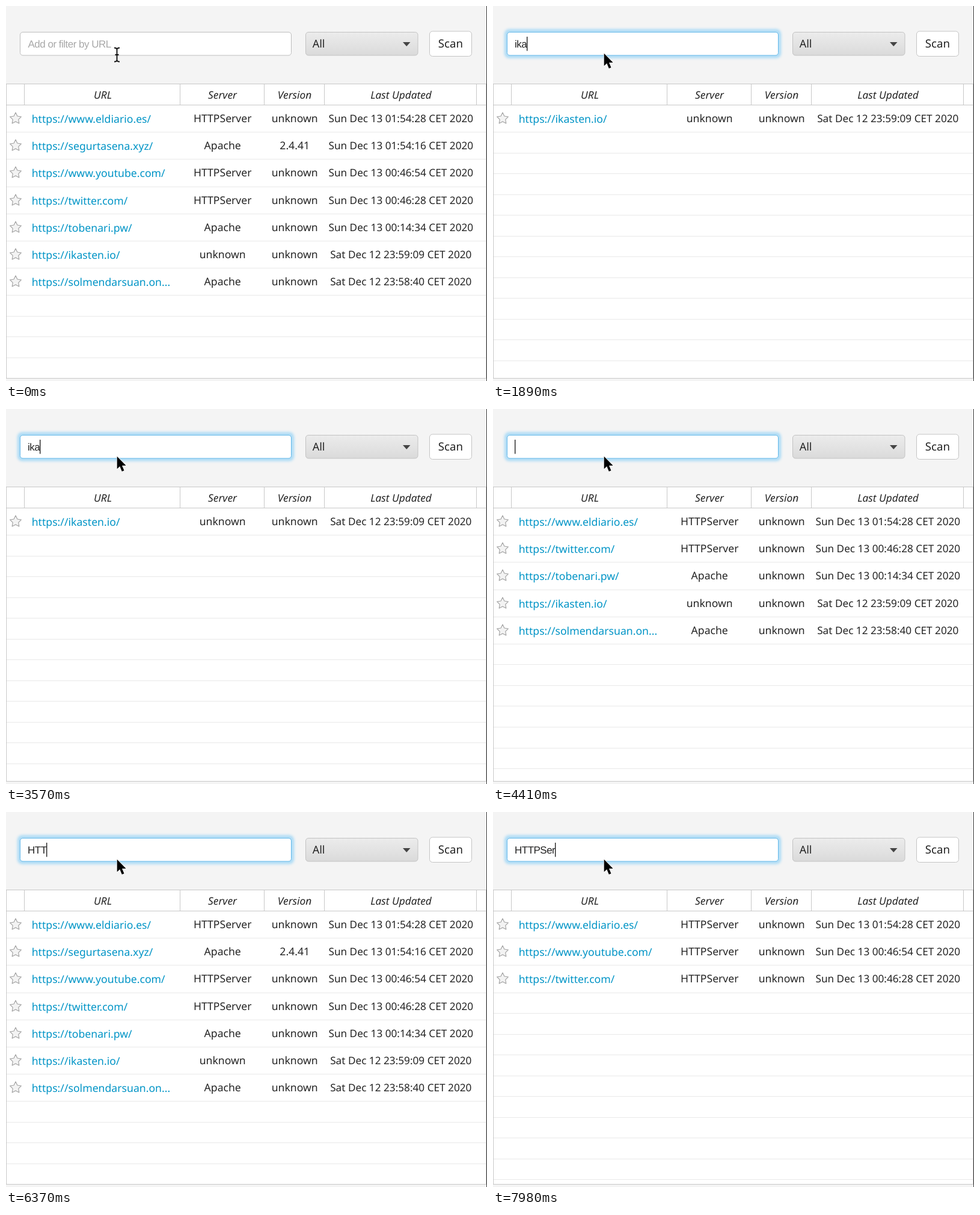
Animation, 800 px wide and 623 px high, one loop 8 s. Source, as an HTML page:

```html
<!DOCTYPE html>
<html lang="en">
<head>
<meta charset="utf-8">
<title>Server list filter</title>
<style>
  html, body { margin: 0; width: 100%; height: 100%; overflow: hidden; background: #f4f4f4; }
  svg { display: block; }
  text { font: 17.6px "Noto Sans", "Open Sans", sans-serif; fill: #242424; text-rendering: geometricPrecision; white-space: pre; }
  .mid { text-anchor: middle; }
  .head { font-size: 17.3px; font-style: italic; }
  .link { font-size: 17.65px; fill: #0094c6; }
  .date { font-size: 17.2px; }
  .input { font: 17px "Liberation Sans", Arial, sans-serif; letter-spacing: -.03em; }
  .prompt { fill: #a8a8a8; }
  .grid { fill: #e9e9e9; }
  .edge { fill: #c8c8c8; }
  .star { fill: #f3f3f3; stroke: #9f9f9f; stroke-width: 1.1; stroke-linejoin: round; }
</style>
</head>
<body>
<svg id="stage" width="800" height="623" viewBox="0 0 800 623">
  <defs>
    <linearGradient id="shade" x2="0" y2="1">
      <stop offset="0" stop-color="#ececec"/>
      <stop offset="1" stop-color="#dadada"/>
    </linearGradient>
    <filter id="soft" x="-5%" y="-40%" width="110%" height="180%"><feGaussianBlur stdDeviation="1.9"/></filter>
  </defs>
  <rect width="800" height="623" fill="#f4f4f4"/>

  <rect id="glow" x="22" y="41.5" width="454" height="42" rx="5" fill="none" stroke="#a9daf6" stroke-width="6" filter="url(#soft)"/>
  <rect id="field" x="23.5" y="43.5" width="451" height="38.5" rx="4.5" fill="#fff"/>
  <text id="prompt" class="input prompt" x="36.5" y="68.7">Add or filter by URL</text>
  <text id="typed" class="input" x="36" y="68.7"></text>
  <rect id="caret" y="51" width="1.4" height="23.5" fill="#222"/>

  <rect x="498.5" y="43.5" width="186.5" height="38.5" rx="4.5" fill="url(#shade)" stroke="#c2c2c2"/>
  <text x="509.7" y="69" style="font-size:18px">All</text>
  <path d="M660 60h12.5l-6.25 7z" fill="#444"/>
  <rect x="704.5" y="42" width="70" height="41.5" rx="5" fill="#fff" stroke="#c4c4c4"/>
  <text class="mid" x="739.5" y="69" style="font-size:18.7px">Scan</text>

  <rect x=".5" y="129.5" width="798" height="489" fill="#fff" stroke="#c8c8c8"/>
  <g id="header"></g>
  <g id="lines"></g>
  <g id="rows"></g>
  <rect x="799" width="1" height="623" fill="#3c3c3c"/>

  <path id="beam" d="M180 69.5q4.5 0 4.5 3v17q0 3-4.5 3M189 69.5q-4.5 0-4.5 3v17q0 3 4.5 3M181.5 81h6" fill="none" stroke="#111" stroke-width="1.9"/>
  <path id="arrow" d="M184.7 78.8v20.8l4.6-4.3 3.5 8.5 3.7-1.6-3.5-8.2h6.6z" fill="#000" stroke="#fff" stroke-width="1.2" paint-order="stroke"/>
</svg>
<script>
const LOOP = 8000, FOCUS = 420, ARROW = 700, FILTER_LAG = 80, BLINK = 500;
const HEAD_BOTTOM = 164.5, ROW = 45.2, EMPTY_ROW = 34.5, BOTTOM = 618;

const edits = [
  [FOCUS, ''], [980, 'i'], [1260, 'ik'], [1540, 'ika'],
  [3920, 'ik'], [4150, 'i'], [4370, ''],
  [5180, 'H'], [5460, 'HT'], [6230, 'HTT'], [6700, 'HTTP'],
  [7240, 'HTTPS'], [7520, 'HTTPSe'], [7800, 'HTTPSer']
];

const sites = [
  ['https://www.eldiario.es/', 'HTTPServer', 'unknown', 'Sun Dec 13 01:54:28 CET 2020'],
  ['https://segurtasena.xyz/', 'Apache', '2.4.41', 'Sun Dec 13 01:54:16 CET 2020'],
  ['https://www.youtube.com/', 'HTTPServer', 'unknown', 'Sun Dec 13 00:46:54 CET 2020'],
  ['https://twitter.com/', 'HTTPServer', 'unknown', 'Sun Dec 13 00:46:28 CET 2020'],
  ['https://tobenari.pw/', 'Apache', 'unknown', 'Sun Dec 13 00:14:34 CET 2020'],
  ['https://ikasten.io/', 'unknown', 'unknown', 'Sat Dec 12 23:59:09 CET 2020'],
  ['https://solmendarsuan.online/', 'Apache', 'unknown', 'Sat Dec 12 23:58:40 CET 2020']
];

const $ = id => document.getElementById(id);

function add(parent, tag, attrs, content = '') {
  const node = document.createElementNS('http://www.w3.org/2000/svg', tag);
  for (const key in attrs) node.setAttribute(key, attrs[key]);
  node.textContent = content;
  return parent.appendChild(node);
}

const label = (parent, cls, x, y, content) => add(parent, 'text', { class: cls, x, y }, content);
const show = (id, on) => { $(id).style.display = on ? '' : 'none'; };
const shorten = url => url.length > 26 ? url.slice(0, 24) + '...' : url;

const starPoints = Array.from({ length: 10 }, (_, i) => {
  const angle = (i / 5 - 0.5) * Math.PI, radius = i % 2 ? 5 : 9.9;
  return `${16 + radius * Math.cos(angle)},${187 + radius * Math.sin(angle)}`;
}).join(' ');

[['URL', 161], ['Server', 360], ['Version', 480], ['Last Updated', 657]]
  .forEach(([name, x]) => label($('header'), 'mid head', x, 154, name));
[30, 289, 429, 529, 782]
  .forEach(x => add($('header'), 'rect', { class: 'edge', x, y: 130, width: 1, height: 34 }));
add($('header'), 'rect', { class: 'edge', x: 1, y: 164, width: 797, height: 1 });

const rows = sites.map(([url, server, version, date]) => {
  const row = add($('rows'), 'g', {});
  add(row, 'polygon', { class: 'star', points: starPoints });
  label(row, 'link', 42.7, 194, shorten(url));
  label(row, 'mid', 360.2, 193, server);
  label(row, 'mid', 480.2, 193, version);
  label(row, 'mid date', 656.8, 193, date);
  return row;
});

function drawTable(query) {
  const needle = query.toLowerCase();
  let count = 0;
  sites.forEach(([url, server], i) => {
    const match = `${url} ${server}`.toLowerCase().includes(needle);
    rows[i].style.display = match ? '' : 'none';
    if (match) rows[i].setAttribute('transform', `translate(0 ${Math.round(ROW * count++)})`);
  });
  $('lines').textContent = '';
  let y = HEAD_BOTTOM;
  for (let i = 0; ; i++) {
    y += i < count ? ROW : EMPTY_ROW;
    if (y >= BOTTOM) break;
    add($('lines'), 'rect', { class: 'grid', x: 1, y: Math.floor(y), width: 797, height: 1 });
  }
}

const lastEdit = time => edits.filter(([at]) => at <= time).pop() || [0, ''];
let shownQuery = null;

function draw(time) {
  const focused = time >= FOCUS;
  const [editedAt, text] = lastEdit(time);
  const query = lastEdit(time - FILTER_LAG)[1];

  show('glow', focused);
  show('prompt', !focused);
  show('beam', time < ARROW);
  show('arrow', time >= ARROW);
  $('field').setAttribute('stroke', focused ? '#5fb6e8' : '#bebebe');

  if ($('typed').textContent !== text) $('typed').textContent = text;
  const width = text ? $('typed').getComputedTextLength() : 0;
  $('caret').setAttribute('x', Math.round(35.6 + width));
  show('caret', focused && Math.floor((time - editedAt) / BLINK) % 2 === 0);

  if (query !== shownQuery) drawTable(shownQuery = query);
}

const start = performance.now();
function tick() {
  draw((performance.now() - start) % LOOP);
  requestAnimationFrame(tick);
}
tick();
</script>
</body>
</html>
```
